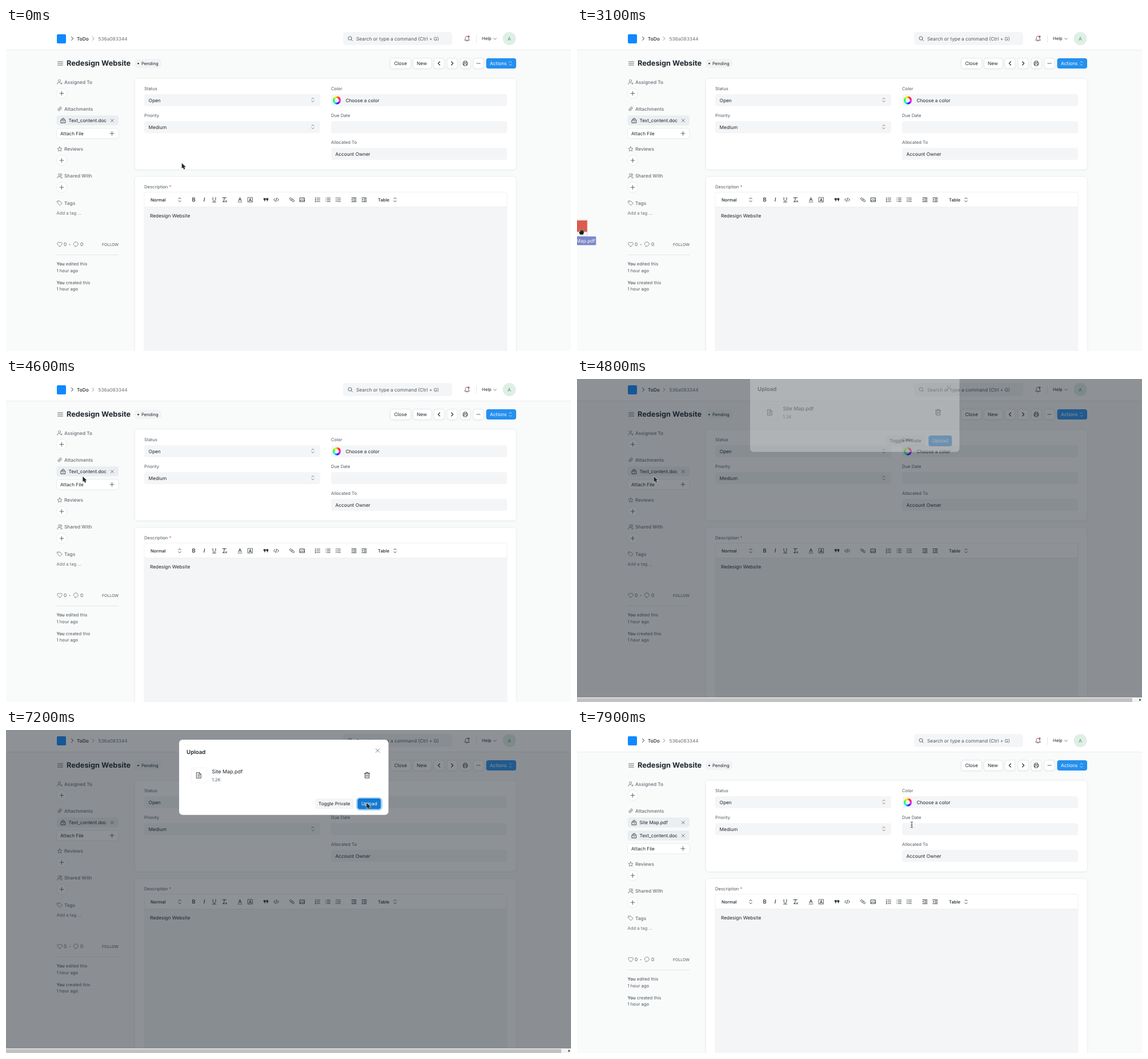
Recreate the animation shown at these times as an HTML page. Size 989 by 566 pixels, loop 8000 ms.

```html
<!DOCTYPE html>
<html lang="en">
<head>
<meta charset="utf-8">
<title>ToDo</title>
<style>
html, body { margin: 0; width: 100%; height: 100%; overflow: hidden; background: #f9fafa; }
svg { display: block; font-family: Inter, sans-serif; text-rendering: geometricPrecision; white-space: pre; }
</style>
</head>
<body>
<svg id="stage" width="989" height="566" viewBox="0 0 989 566"></svg>
<script>
const INK = '#1f272e', GREY = '#505a62', MUTED = '#687178', FIELD = '#f4f5f6', LINE = '#e2e6e9', BLUE = '#2490ef';
const BASE = 8.3, SMALL = 7.66;

// y is the vertical centre of the capitals
const text = (x, y, s, size = BASE, fill = INK, weight = 400, extra = '') =>
  `<text x="${x}" y="${y + size * .364}" font-size="${size}" fill="${fill}" font-weight="${weight}" ${extra}>${s}</text>`;
const box = (x, y, w, h, fill, r = 4, extra = '') =>
  `<rect x="${x}" y="${y}" width="${w}" height="${h}" rx="${r}" fill="${fill}" ${extra}/>`;
const icon = (x, y, d, color = GREY, width = .8, fill = 'none') =>
  `<path transform="translate(${x} ${y})" d="${d}" fill="${fill}" stroke="${color}" stroke-width="${width}" stroke-linecap="round" stroke-linejoin="round"/>`;
const dot = (x, y, r, fill, extra = '') => `<circle cx="${x}" cy="${y}" r="${r}" fill="${fill}" ${extra}/>`;
const group = (id, body) => `<g id="${id}">${body}</g>`;
const edge = `stroke="${LINE}" stroke-width=".8"`;
const button = (x, w, body) => box(x, 53, w, 18, '#fff', 4, `${edge} filter="url(#soft)"`) + body;

const PLUS = 'M-3.5 0H3.5M0 -3.5V3.5', CROSS = 'M-2.4 -2.4 2.4 2.4M2.4 -2.4 -2.4 2.4';
const UPDOWN = 'M-2 -1.6 0 -3.6 2 -1.6M-2 1.6 0 3.6 2 1.6';
const RIGHT = 'M-1.4 -3 1.6 0 -1.4 3', LEFT = 'M1.4 -3 -1.6 0 1.4 3', DOWN = 'M-2.4 -1.2 0 1.2 2.4 -1.2';
const LINES = 'M-1.5 -3H4M-1.5 0H4M-1.5 3H4';

function navbar() {
  return box(0, 0, 989, 38, '#fff', 0) + box(0, 38, 989, .8, '#e6e9eb', 0) +
    box(89, 11, 16, 16, '#0f89ff', 2) +
    icon(116, 18.5, RIGHT, INK, 1) + text(124, 18.5, 'ToDo', BASE, INK, 500) +
    icon(152.5, 18.5, RIGHT, MUTED) + text(161.5, 18.5, '536a083344', BASE, MUTED) +
    box(590, 7, 191, 23, FIELD, 5) + icon(602.5, 18.5, 'M2.6 -.5A3.1 3.1 0 1 1 -3.6 -.5 3.1 3.1 0 1 1 2.6 -.5M1.8 1.8 4 4', GREY, .9) +
    text(613, 18.8, 'Search or type a command (Ctrl + G)', BASE, GREY) +
    icon(807, 18.5, 'M-4 2.6C-2.6 1.6 -3 -.5 -2.8 -1.8 -2.4 -4.8 2.4 -4.8 2.8 -1.8 3 -.5 2.6 1.6 4 2.6ZM-1.2 4.2Q0 5.2 1.2 4.2', GREY, .9) +
    dot(809.8, 15, 1.8, '#e24c4c') + box(823, 12, .8, 14, '#dce0e3', 0) +
    text(833, 18.5, 'Help', SMALL, INK) + icon(856, 19, DOWN, GREY) +
    dot(881, 18.5, 11.5, '#e0efe6') + text(881, 18.5, 'A', 8.6, '#38a160', 400, 'text-anchor="middle"');
}

function heading() {
  return icon(95, 62, 'M-4.5 -3H4.5M-4.5 0H4.5M-4.5 3H4.5', GREY, .9) +
    text(106, 61.7, 'Redesign Website', 12.76, INK, 700) +
    box(225, 54, 47, 16, '#f1f3f4', 6) + dot(231.5, 62.2, 1.3, INK) + text(237, 62.4, 'Pending', SMALL) +
    button(672.5, 36, text(679.5, 62, 'Close')) + button(712.5, 32.5, text(719, 62, 'New')) +
    button(749, 18, icon(758, 62, LEFT, INK, 1.1)) + button(772, 18, icon(781, 62, RIGHT, INK, 1.1)) +
    button(795, 18, icon(804, 62, 'M-2.5 -1.5V-4H2.5V-1.5M-2.5 2H-4V-1.5H4V2H2.5M-2.5 .8H2.5V4H-2.5Z', INK)) +
    button(818, 18, [-2.4, 0, 2.4].map(d => dot(827 + d, 62, .75, INK)).join('')) +
    box(840.5, 53, 52.5, 18, BLUE) + text(847, 62, 'Actions', BASE, '#fff') + icon(883, 62, UPDOWN, '#fff', .7);
}

function section(y, name, shape) {
  return icon(94, y, shape, MUTED) + text(102, y, name, BASE, MUTED, 500);
}
const add = y => dot(97.5, y, 9, '#fff', edge) + icon(97.5, y, PLUS, GREY, .9);
const attachment = (y, name) => box(88.5, y - 8.8, 108.5, 17.4, '#ebeef0') +
  icon(100, y + .4, 'M-3.6 -1.3H3.6V3.8H-3.6ZM-2 -1.5V-2.5Q-2 -4.3 0 -4.3T2 -2.5M0 .6V1.8', INK, .85) +
  text(109.5, y, name, 8.2) + icon(185.8, y + .2, CROSS, GREY);
const person = 'M1.5 -2A2 2 0 1 1 -2.5 -2 2 2 0 1 1 1.5 -2M-4 4V2.8Q-4 1.2 -2 1.2H.5';

function sidebar() {
  const log = (y, verb) => text(88.5, y, `<tspan font-weight="600">You</tspan> ${verb} this`, SMALL, GREY) +
    text(88.5, y + 11.7, '1 hour ago', SMALL, GREY);
  return section(94.5, 'Assigned To', person + 'M1.5 2.6H4.3M2.9 1.2V4') + add(114.5) +
    section(141.8, 'Attachments', 'M3.6 -1 .2 2.6C-1.6 4.4 -4.6 1.8 -2.8 -.2L.4 -3.4C1.8 -4.6 3.6 -2.8 2.4 -1.5L-.6 1.6C-1.4 2.2 -2 1.2 -1.4 .6L1.2 -2') +
    group('fresh', attachment(162, 'Site Map.pdf')) +
    group('lower', attachment(162, 'Text_content.doc') +
      box(88.5, 176, 108.5, 17.8, '#fff', 4, edge) + text(95, 185, 'Attach File', 8.2) + icon(185.5, 184.8, PLUS, GREY, .9) +
      section(212, 'Reviews', 'M0 -4 1.2 -1.3 4 -1 1.9 .9 2.5 3.8 0 2.3 -2.5 3.8 -1.9 .9 -4 -1 -1.2 -1.3Z') + add(232) +
      section(259.2, 'Shared With', person + 'Q2.4 1.2 2.4 4M1.8 -4A2 2 0 0 1 1.8 0M3 1.2Q4.4 1.8 4.4 4') + add(279.2) +
      section(306.7, 'Tags', 'M-4 -3.6H0L4.2 .4 .4 4 -4 -.2ZM-2 -2V-1.8') +
      text(88.5, 324, 'Add a tag ...', SMALL, MUTED) +
      icon(94, 379, 'M0 3.8C-8 -1 -3 -5.6 0 -2.4 3 -5.6 8 -1 0 3.8Z', MUTED) + text(101, 379, '0', BASE, GREY) +
      dot(111.7, 379.5, .8, GREY) +
      icon(122.7, 379, 'M-3.8 1.5A4 3.6 0 1 1 .5 3L-2 4.4V2.6M-3.8 1.5', MUTED) + text(130, 379, '0', BASE, GREY) +
      text(168, 379.2, 'FOLLOW', 6.95, GREY) + box(88.5, 397.2, 108.5, .8, '#dce0e3', 0) +
      log(413.2, 'edited') + log(445.9, 'created'));
}

function wheel(x, y) {
  let out = '';
  for (let a = 0; a < 360; a += 10) {
    const p = d => `${5.4 * Math.cos(d * Math.PI / 180)} ${-5.4 * Math.sin(d * Math.PI / 180)}`;
    out += `<path transform="translate(${x} ${y})" d="M${p(a)}A5.4 5.4 0 0 0 ${p(a + 11)}" fill="none" stroke="hsl(${a - 45} 100% 50%)" stroke-width="3.2"/>`;
  }
  return out;
}

function form() {
  const card = (y, h) => box(225.5, y, 667.5, h, '#fff', 5, 'stroke="#ebeef0" stroke-width=".6" filter="url(#soft)"');
  const field = (x, y, label, value = '', indent = 7.6) => text(x, y, label, SMALL, GREY) +
    box(x, y + 9.5, 308, 21, FIELD) + text(x + indent, y + 20.2, value);
  return card(88.5, 159.5) + card(260.5, 330) +
    field(242, 106.5, 'Status', 'Open') + icon(537, 126, UPDOWN) +
    field(242, 153.7, 'Priority', 'Medium') + icon(537, 173.2, UPDOWN) +
    field(569, 106.5, 'Color', 'Choose a color', 25.4) + wheel(579, 126.7) +
    field(569, 153.7, 'Due Date') + field(569, 200.6, 'Allocated To', 'Account Owner');
}

function editor() {
  const y = 301, A = 'M-2.4 2.6 0 -3.4 2.4 2.6M-1.5 .6H1.5';
  const letter = (x, s, extra) => text(x, y, s, 9.4, INK, 500, `text-anchor="middle" ${extra}`);
  return text(242, 278.5, 'Description <tspan fill="#e24c4c">*</tspan>', SMALL, GREY) +
    box(242, 287.5, 635, 300, '#fff', 4, 'stroke="#eceef0" stroke-width=".8"') + box(242, 314, 635, 252, FIELD, 0) +
    box(242, 313.4, 635, .8, '#e6e9eb', 0) +
    text(253, y, 'Normal', SMALL, INK, 500) + icon(304, y, UPDOWN, INK, .9) +
    letter(328.5, 'B', '') + letter(347, 'I', 'font-style="italic"') +
    icon(364.5, y, 'M-2.4 -4V-.5C-2.4 3 2.4 3 2.4 -.5V-4M-3 4H3', INK, .9) +
    icon(382.5, y, 'M-3.5 -3.6H3M0 -3.6 -1.6 3.4M-3.2 3.4H.2M1.6 1.4 4 4M4 1.4 1.6 4', INK, .9) +
    icon(409.5, y - .6, A, INK, .9) + icon(409.5, y, 'M-3.5 4H3.5', MUTED, 1) +
    icon(427.5, y, 'M-4 -4H4V4H-4Z', INK, .7) + icon(427.5, y + .3, 'M-2 2.4 0 -2.8 2 2.4M-1.2 .8H1.2', INK, .9) +
    icon(455, y, 'M-3.6 -2.6H-.8V0L-2.4 2.6 -2.2 0H-3.6ZM1 -2.6H3.8V0L2.2 2.6 2.4 0H1Z', INK, .6, INK) +
    icon(473, y, 'M-2 -2.4 -4.4 0 -2 2.4M2 -2.4 4.4 0 2 2.4M.8 -3 -.8 3', INK, .9) +
    icon(500.5, y, 'M-.2 -1.8 -1.4 -3C-3 -4.4 -5 -2.2 -3.4 -.8L-1.6 1C-.6 1.8 .6 1.4 1 .4M.2 1.8 1.4 3C3 4.4 5 2.2 3.4 .8L1.6 -1C.6 -1.8 -.6 -1.4 -1 -.4', INK, .9) +
    icon(518.5, y, 'M-4 -3.2H4V3.2H-4ZM-4 2.4 -1.4 -.2 .4 1.4 1.8 .2 4 2.2M1.6 -1.6H1.8', INK, .9) +
    icon(545.5, y, LINES + 'M-3.8 -4V-2M-4.2 -.6H-3.4L-4.2 .8H-3.4M-4.2 2.4H-3.4V4H-4.2', INK) +
    icon(563.5, y, LINES + 'M-3.8 -3H-3.6M-3.8 0H-3.6M-3.8 3H-3.6', INK, .9) +
    icon(581.5, y, LINES + 'M-4.4 -3 -3.8 -2.4 -2.8 -3.8M-4.4 2.8 -3.8 3.4 -2.8 2M-4.2 0H-3.2', INK) +
    icon(609, y, 'M-4 -3.4H4M-.4 -1.2H4M-.4 1.2H4M-4 3.4H4M-2 -1.4 -4 0 -2 1.4', INK, .9) +
    icon(627, y, 'M-4 -3.4H4M-.4 -1.2H4M-.4 1.2H4M-4 3.4H4M-4 -1.4 -2 0 -4 1.4', INK, .9) +
    text(651, y, 'Table', SMALL, INK, 500) + icon(681, y, UPDOWN, INK, .9) +
    text(252, 328.7, 'Redesign Website');
}

function dialog() {
  return box(303, 17, 366.5, 131.8, '#fff', 6) + text(316, 38, 'Upload', 9.7, INK, 600) +
    icon(650.5, 36, 'M-3.3 -3.3 3.3 3.3M3.3 -3.3 -3.3 3.3', GREY) +
    box(324.5, 66, 26.5, 27, '#fff', 4, 'stroke="#f0f2f3" stroke-width=".8"') +
    icon(337.5, 79.5, 'M-3.8 -4.8H1L3.8 -2V4.8H-3.8ZM1 -4.8V-2H3.8M-1.8 0H1.8M-1.8 2.4H1.8M-1.8 -2.2H-.8', INK) +
    text(360.5, 73, 'Site Map.pdf', 8.93) + text(360.5, 87, '1.2K', SMALL, GREY) +
    icon(632, 79.3, 'M-4.6 -3.2H4.6M-3.6 -3.2V4.8H3.6V-3.2M-1.8 -3.2V-5H1.8V-3.2M-1.2 -.8V2.4M1.2 -.8V2.4', INK, .9) +
    box(541, 120, 68, 18.6, FIELD) + text(547, 129.3, 'Toggle Private', 8.2) +
    box(614, 119, 44, 21, 'none', 5, 'id="ring" stroke="#a3d3fb" stroke-width="2"') +
    box(615.3, 120, 41, 18.8, BLUE, 4, 'id="send"') + text(622, 129.3, 'Upload', 8.2, '#fff');
}

function dragged() {
  return box(104.5, 191, 23, 29, '#f7f4f3', 1, 'stroke="#d0cccc" stroke-width=".6" opacity=".9"') +
    box(107, 193, 20, 20, '#d9503f', 0, 'opacity=".92"') +
    box(88.5, 221, 54, 15.4, '#7b88ca', 1) + text(91, 228.5, 'Site Map.pdf', 8.4, '#fff', 400, 'font-family="Noto Sans, sans-serif"') +
    icon(117, 213.5, 'M-4.2 0 -2.6 -.6V-3.4Q-1.8 -4.6 -1 -3.6 0 -5 1 -3.8 2.2 -4.6 2.8 -3.2 4.4 -3.4 4.4 -1.8V1.2L3 4.6H-2L-4.4 1.4Z', '#fff', .5, '#1c1c1c') +
    icon(117, 213.5, 'M-1 -3V-1.4M1 -3.2V-1.4M2.8 -2.8V-1.4', '#aaa', .4);
}

function scrollbar() {
  return box(0, 558, 989, 8, '#f3f3f3', 0) + box(0, 559.2, 972, 6.8, '#c1c1c1', 0) +
    icon(986, 562.3, 'M-1.2 -1.8 1.4 0 -1.2 1.8Z', '#333', .4, '#333');
}

const stage = document.getElementById('stage');
stage.innerHTML = `<filter id="soft" x="-10%" y="-20%" width="120%" height="150%">
  <feDropShadow dx="0" dy=".5" stdDeviation=".8" flood-color="#192734" flood-opacity=".1"/></filter>` +
  navbar() + heading() + sidebar() + form() + editor() +
  box(0, 0, 989, 566, INK, 0, 'id="shade"') + group('modal', dialog()) + group('bar', scrollbar()) +
  group('drag', dragged()) +
  group('arrow', icon(0, 0, 'M.4 .4V10.6L2.7 8.8 4.3 12 6.7 10.9 5.3 7.8H8.2Z', '#fff', .5, '#22272b')) +
  group('beam', icon(0, 0, 'M-1.8 -5Q0 -5 0 -4 0 -5 1.8 -5M0 -4V4M-1.8 5Q0 5 0 4 0 5 1.8 5M-1 .8H1', '#fff', 1.5) +
    icon(0, 0, 'M-1.8 -5Q0 -5 0 -4 0 -5 1.8 -5M0 -4V4M-1.8 5Q0 5 0 4 0 5 1.8 5M-1 .8H1', '#222', .8));

const part = id => document.getElementById(id);
const show = (id, on) => part(id).setAttribute('visibility', on ? 'visible' : 'hidden');
const move = (id, [x, y]) => part(id).setAttribute('transform', `translate(${x} ${y})`);
const set = (id, name, value) => part(id).setAttribute(name, value);

// Waypoints are [time, x, y], eased between neighbours
function along(points, t) {
  const next = points.findIndex(p => p[0] > t);
  if (next === 0) return points[0].slice(1);
  if (next < 0) return points.at(-1).slice(1);
  const [t0, x0, y0] = points[next - 1], [t1, x1, y1] = points[next];
  const k = (t - t0) / (t1 - t0), e = k * k * (3 - 2 * k);
  return [x0 + (x1 - x0) * e, y0 + (y1 - y0) * e];
}
const arrowPath = [[900, 307, 236], [1700, 8, 390], [4600, 8, 390], [4600, 133.7, 170], [5200, 133.7, 170],
  [5500, 170, 185], [6100, 503.5, 149], [6700, 631, 120.5], [6900, 630.5, 127]];
const dragPath = [[2900, -125, 165], [3800, 0, 0], [4200, 16, -46.5]];
const beamPath = [[7600, 627, 131], [7900, 586, 166]];

function draw(now) {
  const t = Math.floor(now % 8000 / 100) * 100;
  const done = t >= 7500, open = t >= 4800 && !done;
  show('arrow', t < 1800 || t >= 4600 && !done);
  move('arrow', along(arrowPath, t));
  show('drag', t >= 3000 && t < 4600);
  move('drag', along(dragPath, t));
  show('beam', done);
  move('beam', along(beamPath, t));

  show('fresh', done);
  move('lower', [0, done ? 23 : 0]);
  set('shade', 'opacity', open ? .5 : done && t < 7700 ? .17 : 0);
  show('bar', t >= 4800 && t < 7700);

  show('modal', open);
  move('modal', [0, t < 4900 ? -21 : t < 5000 ? -5 : 0]);
  set('modal', 'opacity', t < 4900 ? .3 : t < 5000 ? .9 : 1);
  set('ring', 'opacity', t < 7100 ? 0 : t < 7200 ? .6 : 1);
  set('send', 'fill', t < 7100 ? BLUE : '#1579d0');
  requestAnimationFrame(() => draw(performance.now() - start));
}
const start = performance.now();
draw(0);
</script>
</body>
</html>
```
